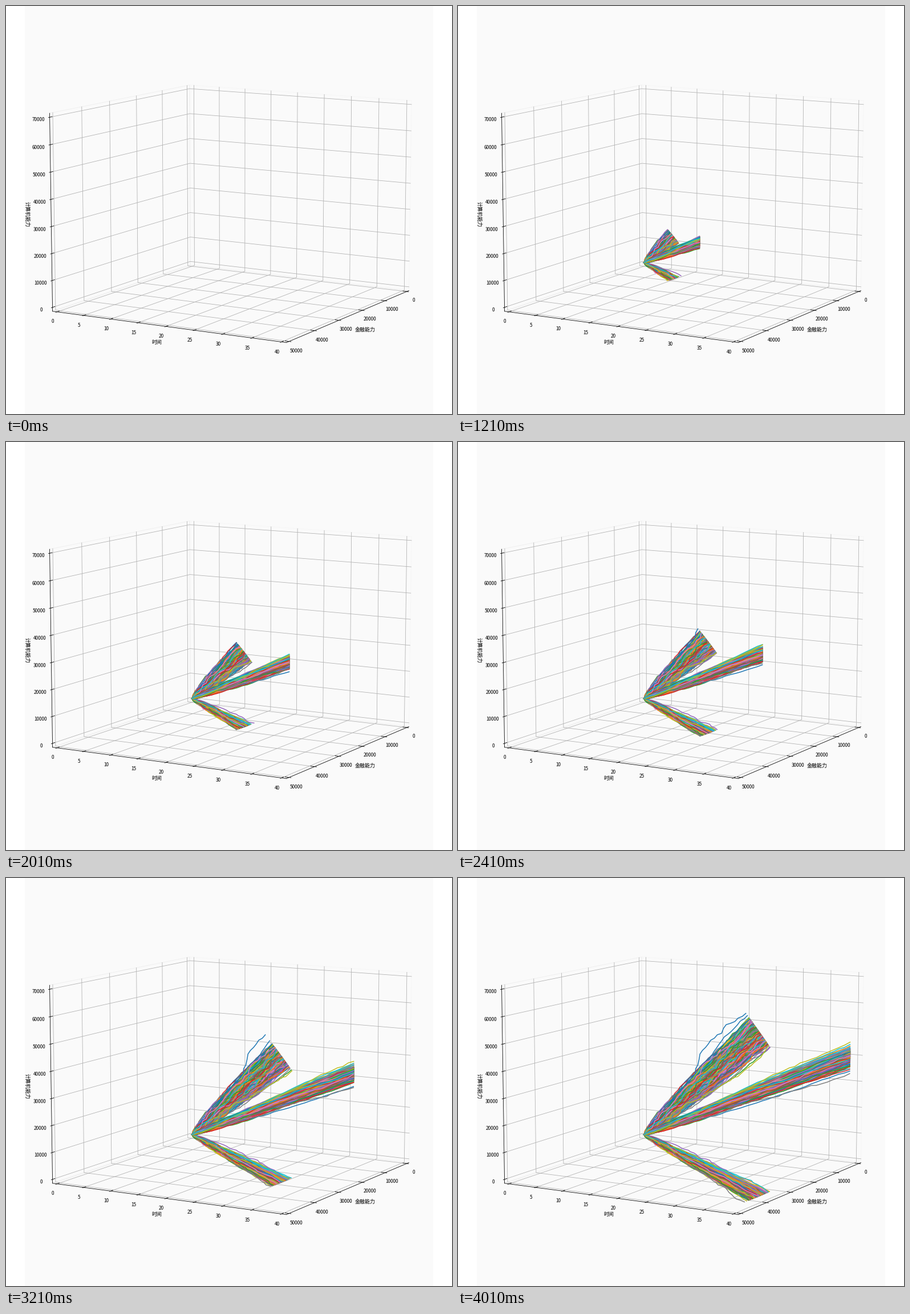
Animation, 782 px wide and 716 px high, one loop 4110 ms. Source, as a matplotlib script:

```python
import numpy as np
import matplotlib.pyplot as plt
from matplotlib.animation import FuncAnimation
from matplotlib.collections import LineCollection
from matplotlib.patches import Polygon, Rectangle

W, H = 782, 716
PT = 0.72                      # points per pixel at 100 dpi
LOOP, TICK = 4110, 30          # ms
FIRST, STEP, LOOKAHEAD = 210, 100, 20
FONT = "Noto Sans CJK JP"

# Camera: x = finance, y = time, z = computing, all scaled to 0..1
SIZE = 1.82946407 / np.sqrt(41) * np.array([4, 4, 3])
ELEV, AZIM, DIST = np.radians(10), np.radians(30), 10
SE, CE, SA, CA = np.sin(ELEV), np.cos(ELEV), np.sin(AZIM), np.cos(AZIM)
RIGHT = np.array([-SA, CA, 0])
UP = np.array([-SE * CA, -SE * SA, CE])
TO_EYE = np.array([CE * CA, CE * SA, SE])
SCALE = H / 0.185
CX = (W - H) / 2 + 0.095 * SCALE
CY = H - 0.095 * SCALE
LO, HI = -1 / 48, 49 / 48      # box edges, slightly outside the data range


def proj(p):
    q = (np.asarray(p, float) - 0.5) * SIZE
    s = SCALE / (DIST - q @ TO_EYE)
    return np.stack([CX + s * (q @ RIGHT), CY - s * (q @ UP)], -1)


fig = plt.figure(figsize=(W / 100, H / 100), dpi=100, facecolor="white")
ax = fig.add_axes([0, 0, 1, 1])
ax.set_xlim(0, W)
ax.set_ylim(H, 0)
ax.axis("off")
ax.add_patch(Rectangle(((W - H) / 2, 0), H, H, fc="#fafafa", lw=0, zorder=0))


def path(points, color, z):
    xy = proj(points)
    ax.plot(xy[:, 0], xy[:, 1], color=color, lw=0.8 * PT, zorder=z)


def pane(corners, grey):
    ax.add_patch(Polygon(proj(corners), fill=False, ec=(grey,) * 3 + (0.5,),
                         lw=PT, zorder=1))


pane([(LO, LO, LO), (LO, HI, LO), (LO, HI, HI), (LO, LO, HI)], 0.95)
pane([(LO, LO, LO), (HI, LO, LO), (HI, LO, HI), (LO, LO, HI)], 0.9)
pane([(LO, LO, LO), (HI, LO, LO), (HI, HI, LO), (LO, HI, LO)], 0.925)

# span, tick spacing, label place, tick place, grid line
AXES = [
    (50000, 10000, lambda v, d: (v, HI + d, LO - d), lambda v, d: (v, HI + d, LO),
     lambda v: [(v, HI, LO), (v, LO, LO), (v, LO, HI)]),
    (40, 5, lambda v, d: (HI + d, v, LO - d), lambda v, d: (HI + d, v, LO),
     lambda v: [(HI, v, LO), (LO, v, LO), (LO, v, HI)]),
    (70000, 10000, lambda v, d: (HI + d, LO - d, v), lambda v, d: (HI + d, LO, v),
     lambda v: [(HI, LO, v), (LO, LO, v), (LO, HI, v)]),
]
LABEL_GAP = 0.0315

for span, gap, label_at, tick_at, grid in AXES:
    path([label_at(LO, 0), label_at(HI, 0)], "black", 3)
    for value in range(0, span + 1, gap):
        v = value / span
        path(grid(v), "#b0b0b0", 2)
        path([tick_at(v, 0.1 / 12), tick_at(v, -0.2 / 12)], "black", 3)
        x, y = proj(label_at(v, LABEL_GAP))
        ax.text(x, y + 6.5, str(value), ha="center", va="baseline",
                family=FONT, size=8.2 * PT, zorder=4)

for x, y, name, angle in [(264, 591, "时间", 0), (630, 568.5, "金融能力", 0),
                          (37, 365.5, "计算机能力", -89.3)]:
    ax.text(x, y, name, ha="center", va="center", rotation=angle,
            rotation_mode="anchor", family=FONT, size=9 * PT, zorder=4)

# Random walks
COUNT, DAYS = 400, 40
MEAN, SPREAD = 1000, 300
days = np.arange(DAYS)
limit = 3.5 * SPREAD * np.sqrt(np.maximum(days, 1))
rng = np.random.default_rng(5)
BLUE, PURPLE, GREY, OLIVE, CYAN = 0, 4, 7, 8, 9


def walks(stray):
    """Many walks held in a soft band; a few bend through given (day, value) points."""
    steps = rng.normal(0, SPREAD, (COUNT, DAYS))
    steps[:, 0] = 0
    w = MEAN * days + limit * np.tanh(steps.cumsum(axis=1) / limit)
    for color, knots in stray.items():
        row = w[COUNT - 10 + color]
        at, goal = np.array([(0, 0)] + knots).T
        row += np.interp(days, at, goal - row[at])
    return w


def bundle(x, z):
    t = np.broadcast_to(days / 40, x.shape)
    return proj(np.stack([x / 50000, t, z / 70000], -1))


both = walks({BLUE: [(18, 20500), (22, 25700), (25, 30600), (28, 34000),
                     (31, 37150), (35, 41000), (39, 44300)],
              OLIVE: [(20, 17200), (31, 26500), (35, 30400), (39, 35300)]})
floor = walks({PURPLE: [(8, 5000), (15, 11060), (23, 19200), (39, 35800)],
               CYAN: [(25, 21800), (35, 30200), (39, 35000)],
               GREY: [(20, 23000), (31, 35000), (39, 44500)]})
wall = walks({OLIVE: [(20, 23000), (27, 31600), (31, 36000), (35, 40300), (39, 44950)],
              GREY: [(22, 18800), (31, 25800), (35, 28800), (39, 32900)]})
zero = np.zeros_like(both)
curves = np.concatenate([bundle(both, 1.5 * both), bundle(floor, zero),
                         bundle(zero, wall)])

colors = [f"C{i % 10}" for i in range(len(curves))]
lines = LineCollection([], colors=colors, linewidths=1.5 * PT,
                       capstyle="projecting", joinstyle="round", zorder=5)
ax.add_collection(lines, autolim=False)


def update(frame):
    now = frame * TICK + LOOKAHEAD
    day = 0 if now < FIRST else min((now - FIRST) // STEP + 1, DAYS - 1)
    lines.set_segments(curves[:, :day + 1] if day else [])
    return [lines]


anim = FuncAnimation(fig, update, frames=LOOP // TICK, interval=TICK,
                     repeat=True, repeat_delay=0)
plt.show()
```
